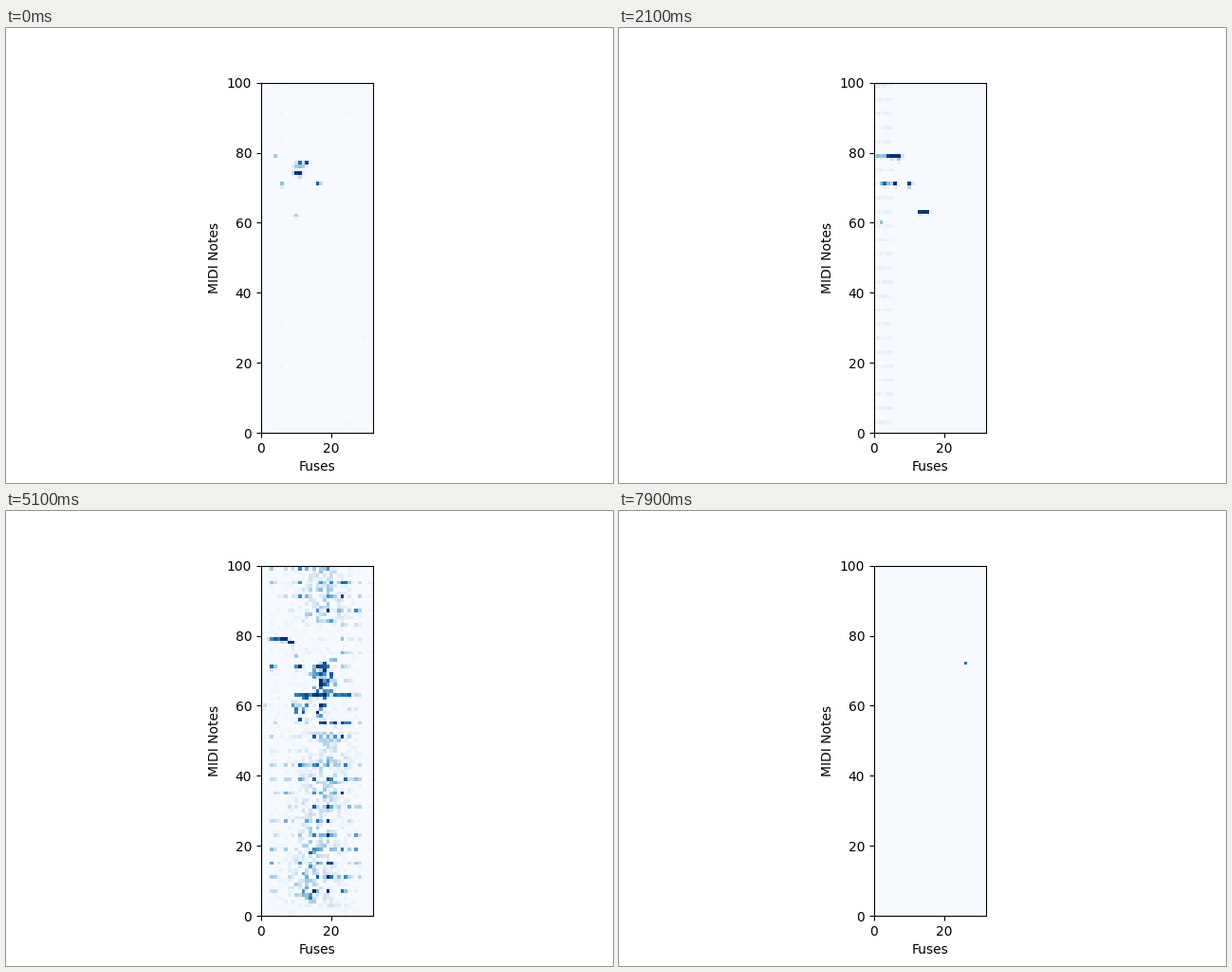
A matplotlib script for the animation above (8000 ms loop, 640 px wide and 480 px high).

```python
import numpy as np
import matplotlib.pyplot as plt
from matplotlib.animation import FuncAnimation

NOTES, FUSES, FRAMES = 128, 32, 80
HOLDS = {45: 44, 70: 69}  # moments when the picture rests
rng = np.random.default_rng(5)
note, fuse = np.mgrid[:NOTES, :FUSES]


def lift(grid, n, f, level):
    if 0 <= f < FUSES:
        grid[n, f] = max(grid[n, f], level)


def state(loud, soft={}, spill=0.3, echo=0, echo_fuses=()):
    """Sounding notes, their bleed into nearby cells and faint comb echoes."""
    grid = np.zeros((NOTES, FUSES))
    for notes, top in ((loud, 1), (soft, 0.42)):
        for n, fuses in notes.items():
            for f in fuses:
                lift(grid, n, f, top * (1 - 0.25 * rng.random() ** 3))
                for dn, df in ((0, -1), (0, 1), (-1, 0)):
                    lift(grid, n + dn, f + df, top * spill * rng.random() ** 2)
    for n in range(3, NOTES, 4):
        for f in echo_fuses:
            lift(grid, n, f, echo * rng.uniform(0.4, 1.4))
    return grid


def storm():
    """Dense state: smeared columns, a comb every four notes, a dark core."""
    noise = rng.random((NOTES, FUSES))
    outer = (note > 83) | ((note > 3) & (note < 53))
    reach = np.exp(-((fuse - 18) / 8) ** 4)

    # smear leans towards higher fuses as the notes rise
    lean = np.where(note > 60, 18, 13 + 0.13 * note)
    bell = np.exp(-((fuse - lean) / 5) ** 2)
    smear = bell * rng.uniform(0.25, 0.6, (NOTES, 1)) * rng.uniform(0.6, 1.3, FUSES)
    grid = np.where(outer, smear * (0.6 + 0.6 * noise), 0) + 0.05 * noise

    beat = np.array([0.5, 0.25, 0.12, 0.8])[fuse % 4]
    tooth = (0.6 * beat + reach * (0.3 + 0.4 * beat)) * (0.7 + 0.4 * noise)
    tooth *= np.select([note < 4, note == 47, outer | (note == 55)], [0.25, 0.5, 1], 0.5)
    comb = (note % 4 == 3) & (outer | (note < 56) | (fuse > 22))
    grid = np.where(comb, tooth, grid)
    grid *= np.where((fuse < 3) | (fuse > 28), 0.15, 1)

    core = ((note - 67) / 6) ** 2 + ((fuse - 17.3) / 3.8) ** 2 < 1
    tail = (abs(note - 59) < 4.5) & (abs(fuse - 14 - (59 - note) / 4) < 5)
    grid = np.where(core, np.where(noise > 0.2, 0.7 + 0.3 * noise, 0.4), grid)
    grid = np.where(tail, np.where(noise > 0.5, 0.4 + 0.6 * noise, 0.5 * noise), grid)
    ridge = ((note == 63) | (note == 55)) & (abs(fuse - 18) < 8)
    return np.where(ridge, 0.8 + 0.2 * noise, grid)


finale = state(
    {79: range(3, 8), 78: [8, 9], 76: [8], 72: [25], 71: [3, 11, 25]},
    {84: [6], 76: [14, 18], 73: [20, 21], 60: [1, 2]})

# frame -> picture at that moment
score = {
    0: state({77: [11, 13], 74: [10, 11], 71: [16]},
             {79: [4], 76: range(10, 13), 71: [6], 62: [10]},
             echo=0.02, echo_fuses=(4, 6, 25, 29)),
    6: state({71: [5, 6, 9, 11, 13, 15], 67: [13], 63: [14]},
             {79: [5], 71: [10, 16], 67: [15], 63: [13]}, spill=0.15),
    21: state({79: range(4, 8), 71: [3, 6, 10], 63: range(13, 16)},
              {79: range(1, 4), 78: [7], 71: [2, 4], 60: [2]},
              echo=0.07, echo_fuses=range(1, 6)),
    34: state({76: [9], 60: [1, 2, 4, 15]}, {76: [13], 60: [3, 16]},
              echo=0.015, echo_fuses=(4,)),
    40: state({79: range(4, 8), 71: [3, 4, 10, 11, 13, *range(16, 20)],
               63: range(12, 18), 55: [21]},
              {74: [10], 67: [17], 11: [25]},
              spill=0.2, echo=0.1, echo_fuses=(13, 17, 20, 21, 25)),
    63: np.maximum(storm(), finale),
    79: state({72: [26]}, spill=0),
}
times, states = list(score), list(score.values())
switch = rng.uniform(0.15, 0.85, (len(states), NOTES, FUSES))
base = np.where(fuse >= 3, 0.0041, 0)


def level(frame):
    """Each cell flips to the next state at its own moment, with some flicker."""
    frame = HOLDS.get(frame, frame)
    i = min(np.searchsorted(times, frame, side="right") - 1, len(times) - 2)
    u = (frame - times[i]) / (times[i + 1] - times[i])
    w = np.clip((u - switch[i]) / 0.12 + 0.5, 0, 1)
    grid = states[i] * (1 - w) + states[i + 1] * w
    flicker = np.random.default_rng(frame).uniform(-0.35, 0.2, grid.shape)
    grid = grid * (1 + flicker * np.sin(np.pi * u))
    return np.clip(np.maximum(grid, base), 0, 1)


fig, ax = plt.subplots(figsize=(6.4, 4.8), dpi=100)
image = ax.imshow(level(0), cmap="Blues", vmin=0, vmax=1,
                  origin="lower", interpolation="nearest")
ax.set(xlim=(0, FUSES), ylim=(0, 100), xlabel="Fuses", ylabel="MIDI Notes")


def update(frame):
    image.set_data(level(frame))
    return [image]


anim = FuncAnimation(fig, update, frames=FRAMES, interval=100, repeat=True, repeat_delay=0)
plt.show()
```
